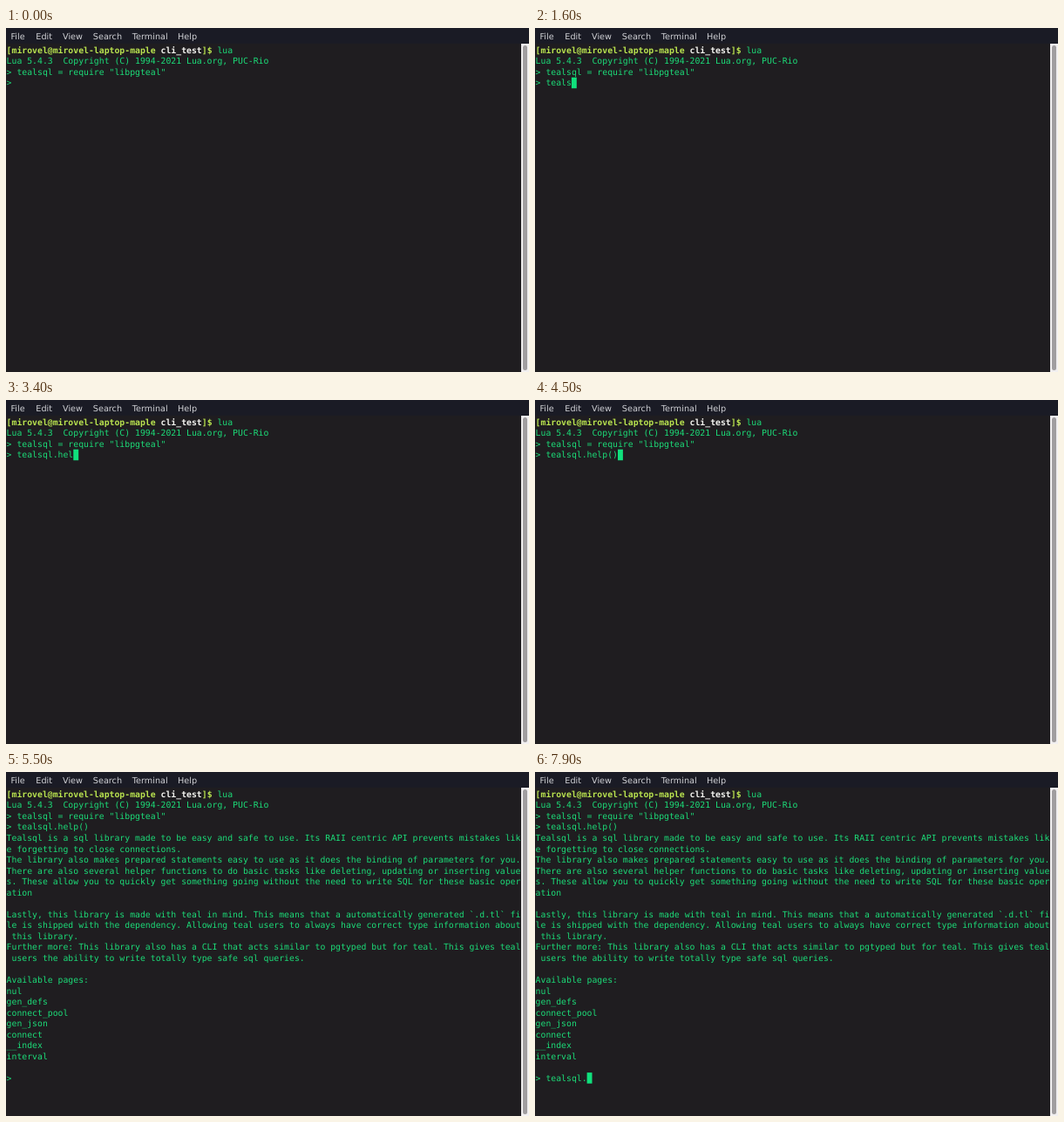
Animation, 600 px wide and 395 px high, one loop 8000 ms. Source, as an HTML page:

```html
<!DOCTYPE html>
<html lang="en">
<head>
<meta charset="utf-8">
<title>Terminal session</title>
<style>
  html, body { margin: 0; width: 100%; height: 100%; overflow: hidden; background: #1f1d20; }
  svg { display: block; width: 600px; height: 395px; }
  text { white-space: pre; text-rendering: geometricPrecision; }
  .menu { font: 9.7px "DejaVu Sans", sans-serif; fill: #d0d1d5; }
  .term { font: 9.8px "DejaVu Sans Mono", monospace; fill: #1cdc78; }
  .bold { font-weight: bold; }
  .user { fill: #b9e34f; }
  .dir { fill: #f4f4f0; }
</style>
</head>
<body>
<svg id="stage" viewBox="0 0 600 395">
  <rect width="600" height="395" fill="#1f1d20"/>
  <rect width="600" height="18" fill="#1a1b25"/>
  <rect x="591" y="18" width="9" height="377" fill="#f1eff0"/>
  <rect x="593" y="20" width="5" height="373" rx="2.5" fill="#a09d9f"/>
</svg>
<script>
const LOOP = 8000;
const LEFT = 0.6, TOP = 19.1, CELL = 5.9, ROW = 12.54, BASELINE = 9.7;
const BLINK = 600;
const PRINT_AT = 4700;

const help = `Tealsql is a sql library made to be easy and safe to use. Its RAII centric API prevents mistakes lik
e forgetting to close connections.
The library also makes prepared statements easy to use as it does the binding of parameters for you.
There are also several helper functions to do basic tasks like deleting, updating or inserting value
s. These allow you to quickly get something going without the need to write SQL for these basic oper
ation

Lastly, this library is made with teal in mind. This means that a automatically generated \`.d.tl\` fi
le is shipped with the dependency. Allowing teal users to always have correct type information about
 this library.
Further more: This library also has a CLI that acts similar to pgtyped but for teal. This gives teal
 users the ability to write totally type safe sql queries.

Available pages:
nul
gen_defs
connect_pool
gen_json
connect
__index
interval`.split("\n");

// Each command: its row, the moment its prompt is ready, and its key times.
const first = {
  row: 3, start: -300, text: "tealsql.help()",
  keys: [700, 1000, 1200, 1400, 1600, 1700, 1900, 2200, 2600, 3000, 3300, 3700, 4000, 4300]
};
const second = {
  row: 5 + help.length, start: PRINT_AT, text: "tealsql.",
  keys: [5700, 6000, 6300, 6600, 6900, 7200, 7500, 7800]
};

const stage = document.getElementById("stage");

function add(parent, tag, attrs, content = "") {
  const node = document.createElementNS("http://www.w3.org/2000/svg", tag);
  for (const name in attrs) node.setAttribute(name, attrs[name]);
  node.textContent = content;
  return parent.appendChild(node);
}

const rowTop = row => TOP + row * ROW;

const addLine = (parent, row, content) =>
  add(parent, "text", { class: "term", x: LEFT, y: rowTop(row) + BASELINE }, content);

[["File", 5.5], ["Edit", 34.3], ["View", 65], ["Search", 99.8], ["Terminal", 144.8], ["Help", 197]]
  .forEach(([label, x]) => add(stage, "text", { class: "menu", x, y: 12.6 }, label));

const shell = addLine(stage, 0, "");
add(shell, "tspan", { class: "bold user" }, "[mirovel@mirovel-laptop-maple");
add(shell, "tspan", { class: "bold dir" }, " cli_test");
add(shell, "tspan", { class: "bold user" }, "]$");
add(shell, "tspan", {}, " lua");
addLine(stage, 1, "Lua 5.4.3  Copyright (C) 1994-2021 Lua.org, PUC-Rio");
addLine(stage, 2, '> tealsql = require "libpgteal"');

const output = add(stage, "g", {});
help.forEach((line, i) => addLine(output, first.row + 1 + i, line));

first.line = addLine(stage, first.row, "");
second.line = addLine(output, second.row, "");
const cursor = add(stage, "rect", { width: CELL, height: ROW, fill: "#10e07c" });

function typeCommand(command, time) {
  const pressed = command.keys.filter(key => key <= time);
  const shown = "> " + command.text.slice(0, pressed.length);
  command.line.textContent = shown;
  return { columns: shown.length, lastKey: pressed.length ? pressed.at(-1) : command.start };
}

function render(time) {
  const printed = time >= PRINT_AT;
  const active = printed ? second : first;
  output.setAttribute("visibility", printed ? "visible" : "hidden");

  const states = new Map([first, second].map(command => [command, typeCommand(command, time)]));
  const { columns, lastKey } = states.get(active);
  // Before the first key the cursor is in the dark half of its blink.
  const phase = time - lastKey + (lastKey < 0 ? BLINK : 0);
  const lit = Math.floor(phase / BLINK) % 2 === 0;
  cursor.setAttribute("x", LEFT + columns * CELL);
  cursor.setAttribute("y", rowTop(active.row));
  cursor.setAttribute("visibility", lit ? "visible" : "hidden");
}

const begin = performance.now();
function tick() {
  render((performance.now() - begin) % LOOP);
  requestAnimationFrame(tick);
}
tick();
</script>
</body>
</html>
```
